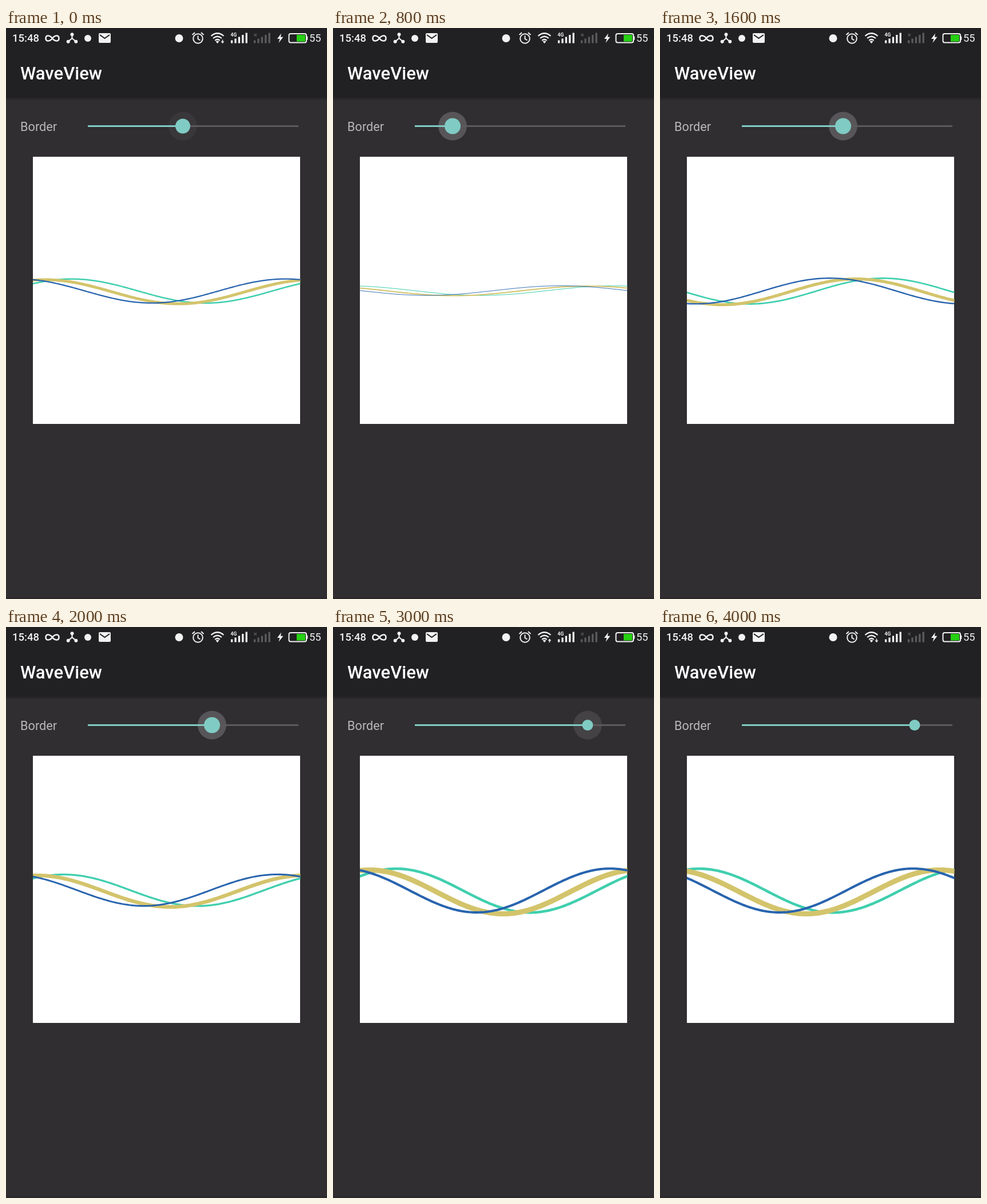
Write an HTML page that moves like this. It is 561 by 998 pixels and loops after 4.2 s.

```html
<!DOCTYPE html>
<html lang="en">
<head>
<meta charset="utf-8">
<title>WaveView</title>
<style>
html, body { margin: 0; width: 100%; height: 100%; overflow: hidden; background: #302e30; }
svg { display: block; width: 100vw; height: 100vh; }
text { font-family: Roboto, "Noto Sans", sans-serif; }
</style>
</head>
<body>
<svg viewBox="0 0 561 998" preserveAspectRatio="none">
  <defs>
    <linearGradient id="shade" x1="0" y1="0" x2="0" y2="1">
      <stop offset="0" stop-color="#000" stop-opacity=".22"/>
      <stop offset="1" stop-color="#000" stop-opacity="0"/>
    </linearGradient>
    <clipPath id="card"><rect x="47" y="225" width="467.5" height="467"/></clipPath>
  </defs>

  <rect width="561" height="998" fill="#302e30"/>
  <rect y="995" width="561" height="3" fill="#2a282a"/>
  <rect width="561" height="122" fill="#212022"/>
  <rect y="122" width="561" height="5" fill="url(#shade)"/>

  <!-- status bar, left -->
  <g fill="#f2f2f2">
    <text x="11" y="24" font-size="18.5" font-weight="500">15:48</text>
    <path d="M81 18C77 12.600 69.500 11.300 69.500 18S77 23.400 81 18S92.500 11.300 92.500 18S85 23.400 81 18Z" fill="none" stroke="#f2f2f2" stroke-width="2.600"/>
    <path d="M115.500 11V18L109 23.500M115.500 18L122 23.500" fill="none" stroke="#f2f2f2" stroke-width="2.200"/>
    <circle cx="115.500" cy="11.300" r="3"/>
    <circle cx="108.700" cy="23.700" r="3"/>
    <circle cx="122.300" cy="23.700" r="3"/>
    <circle cx="143" cy="18" r="6"/>
    <rect x="162" y="9" width="21" height="17" rx="2"/>
    <path d="M164 12L172.500 18L181 12" fill="none" stroke="#212022" stroke-width="2"/>
  </g>

  <!-- status bar, right -->
  <g fill="#f2f2f2">
    <circle cx="302.500" cy="18" r="7"/>
    <g fill="none" stroke="#f2f2f2" stroke-width="2">
      <circle cx="335.500" cy="18.500" r="8.300"/>
      <path d="M335.500 13.500V19L339.500 21.500M325.500 12L330 8M345.500 12L341 8"/>
      <path d="M358.500 14Q369.500 4.500 380.500 14M362 18Q369.500 11.500 377 18M365.300 21.800Q369.500 18.200 373.700 21.800" stroke-width="2.300"/>
    </g>
    <path d="M366.500 23.500Q369.500 21.500 372.500 23.500L369.500 27Z"/>
    <path id="arrow"/>
    <text x="392.500" y="15" font-size="8.500" font-weight="700">4G</text>
    <g id="signal"></g>
    <path d="M433.500 10L438 14.500M438 10L433.500 14.500" stroke="#5c5a5c" stroke-width="1.200"/>
    <path d="M481 9.500L474 19H478.500L476.500 26L484.500 15.800H480Z"/>
    <rect x="494.500" y="10" width="30.500" height="15.500" rx="3" fill="none" stroke="#f2f2f2" stroke-width="2"/>
    <rect x="525" y="14.500" width="2.300" height="6.500" rx="1"/>
    <rect x="508" y="12" width="15" height="11.500" fill="#26d012"/>
    <text x="530" y="24" font-size="18.300">55</text>
  </g>

  <text x="25" y="90" font-size="31" font-weight="500" fill="#fff">WaveView</text>
  <text x="25" y="180" font-size="21.700" fill="#b9b8b9">Border</text>

  <!-- slider -->
  <circle id="halo" cy="171.500" r="25" fill="#fff"/>
  <rect x="143" y="170" width="368" height="3" fill="#5b595b"/>
  <rect id="filled" x="143" y="170" height="3" fill="#80cbc4"/>
  <circle id="thumb" cy="171.500" fill="#80cbc4"/>

  <rect x="47" y="225" width="467" height="467" fill="#fff"/>
  <g id="waves" fill="none" clip-path="url(#card)"></g>
</svg>

<script>
const NS = 'http://www.w3.org/2000/svg';
const STEP = 200, LOOP = 4200;
const LEFT = 47, SPAN = 467, MID = 458.5;
const TRACK = { x: 143, width: 368 };
const byId = id => document.getElementById(id);
const set = (el, attrs) => {
  for (const key in attrs) el.setAttribute(key, attrs[key]);
  return el;
};
const add = (parent, tag, attrs) =>
  parent.appendChild(set(document.createElementNS(NS, tag), attrs));

// [time, value] keys
const SLIDE = [[0, 309], [400, 228], [600, 213], [800, 209], [1000, 219],
  [1200, 287], [1400, 320], [1600, 320], [1800, 339], [2000, 360],
  [2200, 391], [2400, 410], [2600, 426], [2800, 442], [3000, 445]];
const CREST = [[0, 68], [400, 257.5], [1200, 632], [2000, 988],
  [2600, 1288], [3000, 1465], [4000, 1890]];
const GLOW = [[0, 0.045], [200, 0.19], [2800, 0.19], [3000, 0.095], [3200, 0]];
const RADIUS = [[0, 13], [200, 14], [2800, 14], [3000, 9.5]];

function at(keys, t) {
  const i = keys.findIndex(key => key[0] > t);
  if (i < 0) return keys[keys.length - 1][1];
  const [t0, a] = keys[i - 1], [t1, b] = keys[i];
  return a + (b - a) * (t - t0) / (t1 - t0);
}

for (const [x0, fill] of [[393, '#f2f2f2'], [433, '#5c5a5c']])
  for (let i = 0; i < 5; i++) {
    const h = [5, 8, 11, 14.5, 18][i];
    add(byId('signal'), 'rect', { x: x0 + i * 6.4, y: 26.5 - h, width: 3.3, height: h, fill });
  }

// lag is in wavelengths; weight is the line width at full slider
const waves = [
  { stroke: '#40cfae', lag: 0.1, weight: 5.6 },
  { stroke: '#d3c46c', lag: 0, weight: 11 },
  { stroke: '#2864ae', lag: -0.1, weight: 5 }
].map(w => ({ ...w, path: add(byId('waves'), 'path', { stroke: w.stroke }) }));

function curve(crest, height, width) {
  const points = [];
  for (let x = LEFT - 4; x <= LEFT + SPAN + 5; x += 3) {
    const y = MID + width / 2 - height * Math.cos(2 * Math.PI * (x - crest) / SPAN);
    points.push(x + ' ' + y.toFixed(2));
  }
  return 'M' + points.join('L');
}

function arrow(t) {
  if (t >= 800 && t < 2800) return '';
  return t >= 2800 && t < 3800
    ? 'M378.500 20.500L381.500 24H379.300V27H377.700V24H375.500Z'
    : 'M378.500 27L381.500 23.500H379.300V20.500H377.700V23.500H375.500Z';
}

function draw(now) {
  const t = Math.floor(now % LOOP / STEP) * STEP;
  const x = at(SLIDE, t), level = (x - TRACK.x) / TRACK.width;
  set(byId('halo'), { cx: x, 'fill-opacity': at(GLOW, t) });
  set(byId('thumb'), { cx: x, r: at(RADIUS, t) });
  set(byId('filled'), { width: x - TRACK.x });
  set(byId('arrow'), { d: arrow(t) });
  for (const { path, lag, weight } of waves) {
    const width = weight * level;
    set(path, {
      d: curve(at(CREST, t) + lag * SPAN, SPAN / 10 * level, width),
      'stroke-width': width
    });
  }
}

const start = performance.now();
function tick() {
  draw(performance.now() - start);
  requestAnimationFrame(tick);
}
tick();
</script>
</body>
</html>
```
